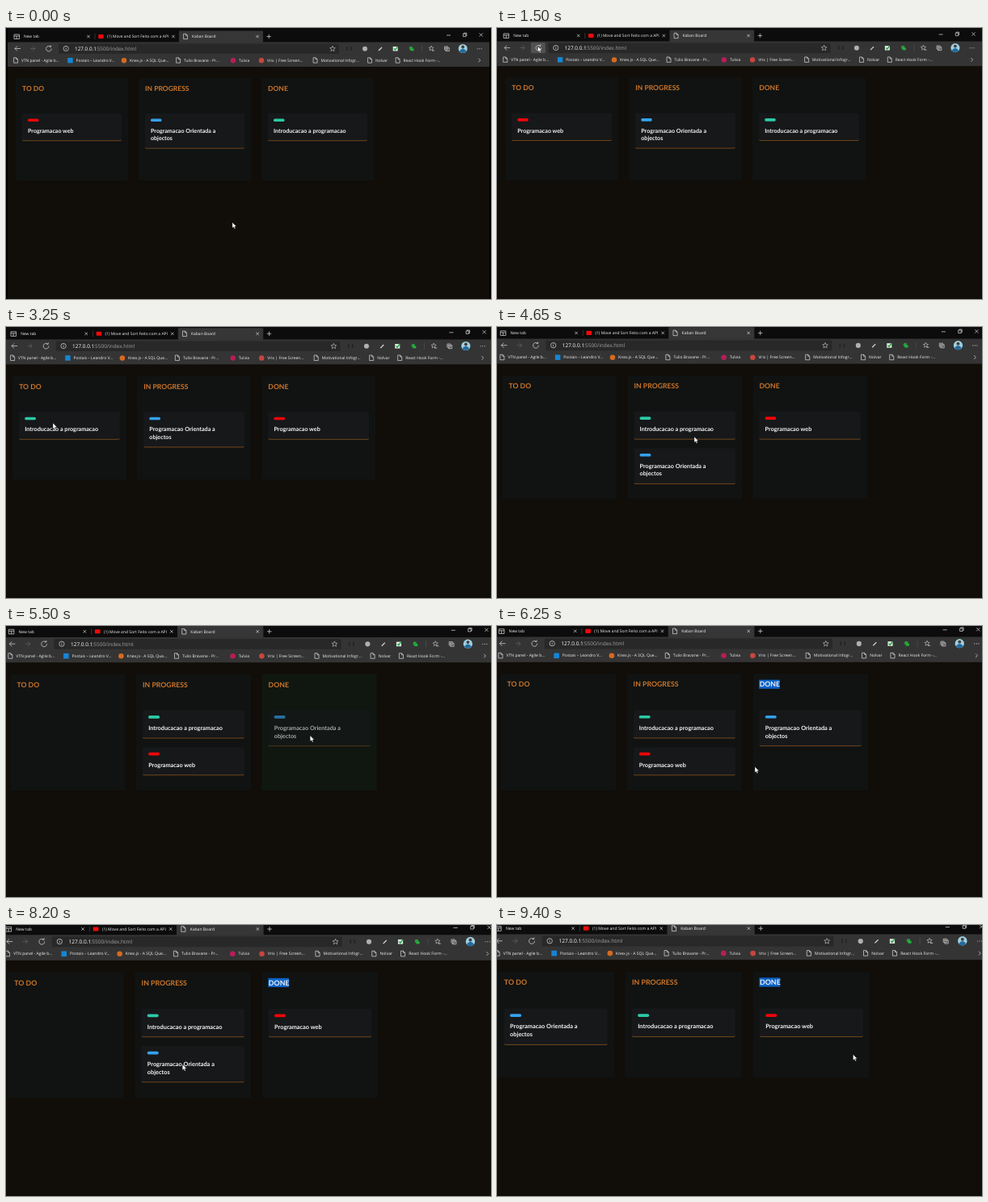
Animation, 600 px wide and 336 px high, one loop 9450 ms. Source, as an HTML page:

```html
<!DOCTYPE html>
<html lang="pt">
<head>
<meta charset="utf-8">
<title>Kaban Board</title>
<style>
  html, body { margin: 0; width: 100%; height: 100%; overflow: hidden; background: #000; }
  svg { display: block; width: 100%; height: 100%; }
  text { font-family: "Open Sans", sans-serif; text-rendering: geometricPrecision; white-space: pre; }
  .small { font-size: 4.9px; font-weight: 500; fill: #f2f2f2; }
  .url { font-size: 6.35px; fill: #a2a2a2; }
  .title { font: 700 8.5px Lato, sans-serif; fill: #cf762a; }
  .label { font: 700 7.1px Lato, sans-serif; fill: #f4f4f4; }
  .line { fill: none; stroke: #dadada; stroke-width: .7; }
</style>
</head>
<body>
<svg viewBox="0 0 600 336"><g id="screen"></g></svg>
<script>
const LOOP = 9450, TICK = 50, ZOOM_PER_MS = 0.04 / 9400;
const COLUMN_TOP = 62, CARD_TOP = 106, CARD_GAP = 10.8, MIN_BOTTOM = 189;
const screenGroup = document.getElementById("screen");

function add(parent, tag, attrs = {}, content) {
  const node = document.createElementNS("http://www.w3.org/2000/svg", tag);
  for (const key in attrs) node.setAttribute(key, attrs[key]);
  if (content !== undefined) node.textContent = content;
  return parent.appendChild(node);
}
const group = () => add(screenGroup, "g");
const rect = (parent, x, y, width, height, fill, rx = 0) =>
  add(parent, "rect", { x, y, width, height, fill, rx });
const circle = (parent, cx, cy, r, fill) => add(parent, "circle", { cx, cy, r, fill });
const line = (parent, d, style = "") => add(parent, "path", { d, class: "line", style });
const text = (parent, x, y, kind, content) => add(parent, "text", { x, y, class: kind }, content);

function docIcon(parent, x, y) {
  line(parent, `M${x - 2.4} ${y - 3.2}h3l2 2v4.4h-5zM${x + .6} ${y - 3.2}v2h2`);
}
function closeIcon(parent, x, y, r = 1.7) {
  line(parent, `M${x - r} ${y - r}l${2 * r} ${2 * r}m0 ${-2 * r}l${-2 * r} ${2 * r}`);
}
function starIcon(parent, x, y, r) {
  const points = Array.from({ length: 10 }, (_, i) => {
    const a = i * Math.PI / 5 - Math.PI / 2, d = i % 2 ? r * .45 : r;
    return `${x + d * Math.cos(a)} ${y + d * Math.sin(a)}`;
  });
  line(parent, `M${points.join("L")}z`, "stroke-width:.55");
}

function buildTabs(g) {
  rect(g, 2, 0, 596, 18, "#0c0c0c");
  rect(g, 214, 3.5, 104, 14.5, "#363636", 1);
  line(g, "M110 7v7", "stroke:#444");
  line(g, "M10 8h6.5v5.5h-6.5zM10 10h6.5M13.2 10v3.5");
  rect(g, 114.2, 8, 6.6, 5, "#f00a0a", 1);
  docIcon(g, 222, 10.5);
  text(g, 22, 12.2, "small", "New tab");
  text(g, 125, 12.2, "small", "(1) Move and Sort Feito com a API");
  text(g, 230, 12.2, "small", "Kaban Board");
  [102, 207, 311].forEach(x => closeIcon(g, x, 10.5));
  line(g, "M322.5 10.5h5.4m-2.7-2.7v5.4");
  line(g, "M545 9h5M565.5 7.2h3.4v3.4h-3.4zM566.5 7.2v-1h3.4v3.4h-1");
  closeIcon(g, 587.7, 8.5, 2.1);
}

function buildToolbar(g) {
  rect(g, 2, 17.5, 596, 30.5, "#343434");
  rect(g, 65, 19.5, 347, 12.5, "#282828", 1.5);
  const hover = rect(g, 43.5, 19, 18, 13, "#515151", 1.5);
  line(g, "M18 25.5h-7m3-3l-3 3l3 3");
  line(g, "M30 25.5h6m-3-3l3 3l-3 3", "stroke:#666");
  line(g, "M55.2 23.3a3.3 3.3 0 1 0 1 2.2M53.6 23.3h2v-2");
  line(g, "M77.3 25.5a3.1 3.1 0 1 0 -6.2 0a3.1 3.1 0 1 0 6.2 0M74.2 25v2m0-3.5v.7");
  text(g, 85, 27.9, "url", "127.0.0.1").style.fill = "#fff";
  text(g, 111, 27.9, "url", ":5500/index.html");
  starIcon(g, 404, 25.8, 3.5);
  line(g, "M422 23v5M427 23v5", "stroke:#222;stroke-width:1.5");
  circle(g, 444, 25.7, 3, "#aeb0b1");
  line(g, "M461 28l4-4", "stroke-width:1.2");
  rect(g, 478.7, 23, 6, 5.5, "#dfe9df");
  line(g, "M480 25.5l1.5 1.6l3-4", "stroke:#17a23a;stroke-width:1.3");
  circle(g, 501, 25, 2.3, "#2d9840");
  rect(g, 500.5, 25.5, 4, 2.8, "#1db43a");
  line(g, "M514.5 21.5v8", "stroke:#505050");
  starIcon(g, 526, 25.3, 3.2);
  line(g, "M527 28h3M542.5 23h4v4h-4zM544 27v1.6h4.3v-4h-1.7M544.5 23.7v2.6m-1.3-1.3h2.6");
  circle(g, 565.2, 25.5, 5.5, "#9dd0e2");
  circle(g, 565.2, 23.5, 1.9, "#493a35");
  add(g, "path", { d: "M560.8 28.8q4.4-6 8.8 0q-4.4 4.4-8.8 0", fill: "#246a9d" });
  [-2.5, 0, 2.5].forEach(d => circle(g, 585.7 + d, 25.7, .55, "#d0d0d0"));
  return hover;
}

function buildBookmarks(g) {
  const items = [
    [12, "", "VTN panel - Agile b..."],
    [79.5, "#1685d3", "Postais – Leandro V..."],
    [146, "#d66a1f", "Knex.js - A SQL Que..."],
    [213, "", "Tulio Bravane - Pr..."],
    [281, "#b81d58", "Tulvia"],
    [316, "#c8453f", "Vrix | Free Screen..."],
    [382.5, "", "Motivational Infogr..."],
    [450, "", "Nolvar"],
    [484.5, "", "React Hook Form -..."]
  ];
  for (const [x, color, label] of items) {
    if (!color) docIcon(g, x, 40);
    else if (x < 100) rect(g, x - 3.2, 37, 6.4, 6.4, color);
    else circle(g, x, 40.2, 3.2, color);
    text(g, x + 7, 41.7, "small", label);
  }
  line(g, "M584.5 37.8l2.3 2.3l-2.3 2.3");
}

function buildCard(color, lines) {
  const g = group(), height = 24.4 + lines.length * 9.5;
  rect(g, 0, 0, 123, height, "#16181a", 1.5);
  add(g, "path", { d: `M.5 ${height - 1.2}q0 1 1 1h120q1 0 1-1`, fill: "none", stroke: "#85501d", "stroke-width": .8 });
  rect(g, 7, 6.4, 13.5, 3.6, color, 1.6);
  lines.forEach((label, i) => text(g, 7, 24 + i * 9.4, "label", label));
  return { g, height };
}

rect(screenGroup, 2, 0, 596, 343, "#110d09");
const chrome = group();
buildTabs(chrome);
const reloadHover = buildToolbar(chrome);
buildBookmarks(chrome);

const columns = ["TO DO", "IN PROGRESS", "DONE"].map((name, i) => {
  const x = 12 + i * 152, g = group();
  const panel = rect(g, x, COLUMN_TOP, 139, 127, "#101312", 1);
  const mark = rect(g, x + 7.5, 69.3, 24.8, 10.8, "#0b63c8");
  return { x, panel, mark, title: text(g, x + 8, 77.9, "title", name) };
});

const cards = {
  web: buildCard("#f00509", ["Programacao web"]),
  oop: buildCard("#34a2ee", ["Programacao Orientada a", "objectos"]),
  intro: buildCard("#2bcaa5", ["Introducacao a programacao"])
};

const cursor = add(screenGroup, "path", {
  d: "M0 0v7l1.6-1.4l1.1 2.4l1.2-.5l-1.1-2.4h2.2z",
  fill: "#fff", stroke: "#111", "stroke-width": .35
});

// time, cards per column, dragged card, column under the pointer
const states = [
  [0, ["web"], ["oop"], ["intro"]],
  [2500, ["web"], ["oop"], ["intro"], "web", 0],
  [2900, [], ["oop"], ["intro", "web"], "web", 2],
  [3000, [], ["oop"], ["intro", "web"]],
  [3080, [], ["oop"], ["intro", "web"], "intro", 2],
  [3180, ["intro"], ["oop"], ["web"], "intro", 0],
  [3250, ["intro"], ["oop"], ["web"]],
  [3550, ["intro"], ["oop"], ["web"], "intro", 0],
  [3700, [], ["intro", "oop"], ["web"], "intro", 1],
  [4000, [], ["intro", "oop"], ["web"]],
  [4900, [], ["intro", "oop"], ["web"], "web", 2],
  [5050, [], ["intro", "oop", "web"], [], "web", 1],
  [5200, [], ["intro", "oop", "web"], []],
  [5320, [], ["intro", "oop", "web"], [], "oop", 1],
  [5450, [], ["intro", "web"], ["oop"], "oop", 2],
  [5600, [], ["intro", "web"], ["oop"]],
  [6400, [], ["intro", "web"], ["oop"], "web", 1],
  [6500, [], ["intro"], ["oop", "web"], "web", 2],
  [6700, [], ["intro"], ["oop", "web"]],
  [6850, [], ["intro"], ["oop", "web"], "oop", 2],
  [7000, [], ["intro", "oop"], ["web"], "oop", 1],
  [7500, [], ["intro", "oop"], ["web"]],
  [8500, [], ["intro", "oop"], ["web"], "oop", 1],
  [8750, ["oop"], ["intro"], ["web"], "oop", 0],
  [9000, ["oop"], ["intro"], ["web"]]
];

const path = [
  [0, 280, 241], [450, 280, 241], [1250, 52, 23.5], [1900, 52, 23.5],
  [2400, 70, 126], [2700, 90, 130], [2930, 365, 140], [3080, 370, 126],
  [3220, 61.3, 119.7], [3530, 61.3, 119.7], [3750, 235, 132], [4650, 245.1, 136.6],
  [4880, 370, 126], [5070, 240, 148], [5300, 230, 168], [5480, 375, 138],
  [5700, 352, 76], [5850, 322, 74], [6050, 330, 220], [6250, 318.5, 174.3],
  [6390, 215, 170], [6540, 370, 150], [6830, 370, 128], [7050, 262, 150],
  [7200, 255.4, 143.7], [7600, 240, 165], [8480, 215, 175], [8760, 100, 150],
  [9000, 90, 140], [9400, 435.1, 160.8], [LOOP, 435.1, 160.8]
];

function pointerAt(t) {
  const i = path.findIndex(p => p[0] > t);
  const [t0, x0, y0] = path[i - 1], [t1, x1, y1] = path[i];
  const k = (t - t0) / (t1 - t0), e = k * k * (3 - 2 * k);
  return [x0 + (x1 - x0) * e, y0 + (y1 - y0) * e];
}

function layout(t) {
  const [, todo, doing, done, dragged, over] = states.findLast(s => s[0] <= t);
  let bottom = MIN_BOTTOM;
  [todo, doing, done].forEach((names, i) => {
    let y = CARD_TOP;
    for (const name of names) {
      const { g, height } = cards[name];
      g.setAttribute("transform", `translate(${columns[i].x + 8} ${y})`);
      g.setAttribute("opacity", name === dragged ? .65 : 1);
      y += height + CARD_GAP;
      bottom = Math.max(bottom, y - CARD_GAP + 18.5);
    }
  });
  columns.forEach(({ panel, mark, title }, i) => {
    const selected = i === 2 && t >= 5850;
    panel.setAttribute("height", bottom - COLUMN_TOP);
    panel.setAttribute("fill", over === i ? "#101710" : "#101312");
    mark.setAttribute("visibility", selected ? "visible" : "hidden");
    title.style.fill = selected ? "#f2f2f2" : "";
  });
}

function render(now) {
  const t = Math.floor(now % LOOP / TICK) * TICK;
  const zoom = 1 + t * ZOOM_PER_MS;
  screenGroup.setAttribute("transform", `translate(300 168) scale(${zoom}) translate(-300 -168)`);
  layout(t);
  reloadHover.setAttribute("visibility", t >= 1200 && t < 2000 ? "visible" : "hidden");
  cursor.setAttribute("transform", `translate(${pointerAt(t)})`);
}

const start = performance.now();
function loop() {
  render(performance.now() - start);
  requestAnimationFrame(loop);
}
loop();
</script>
</body>
</html>
```
